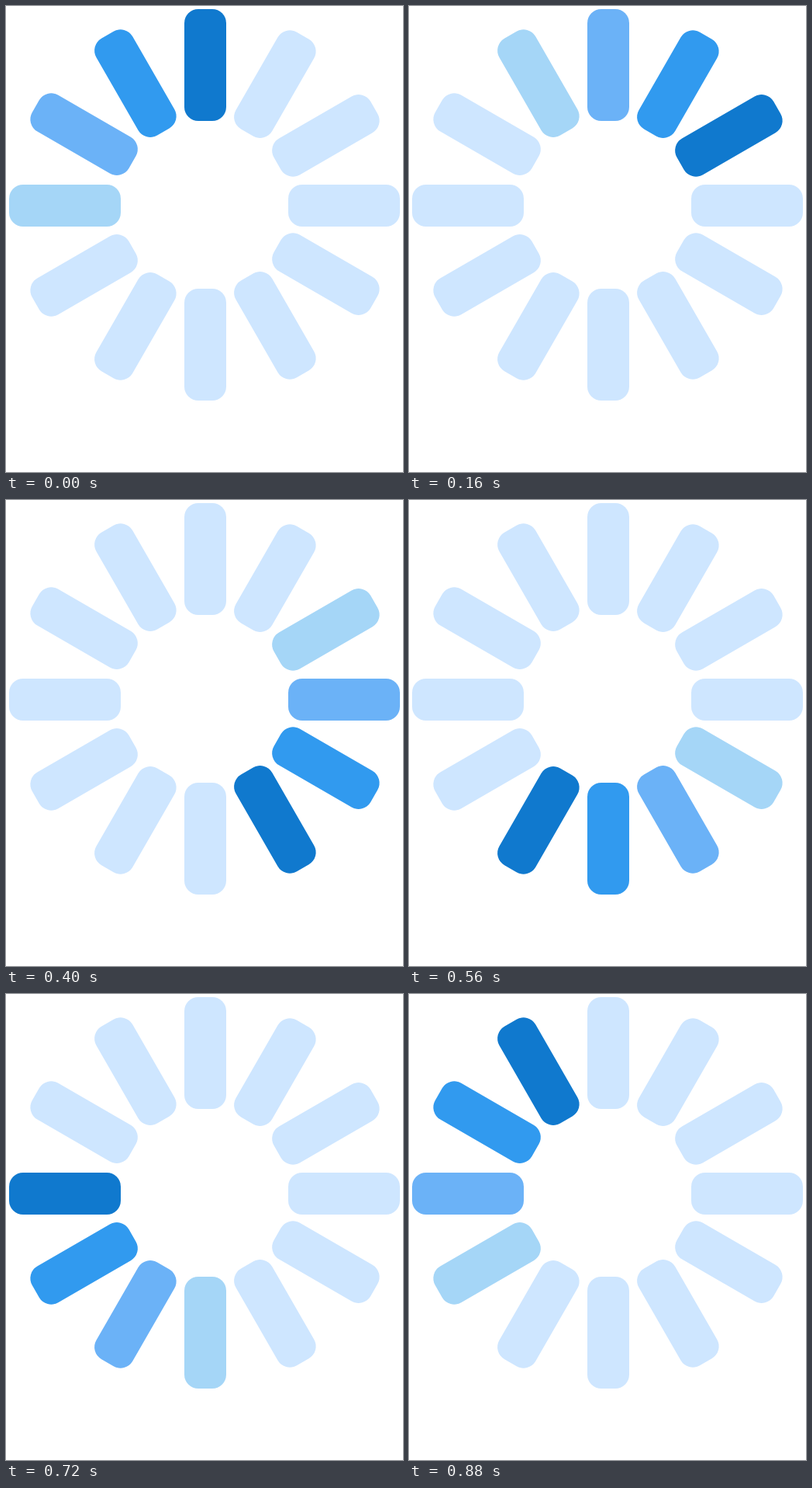
An HTML page for the animation above (0.96 s loop, 512 px wide and 600 px high).

```html
<!DOCTYPE html>
<html lang="en">
<head>
<meta charset="utf-8">
<title>Loading spinner</title>
<style>
  html, body { margin: 0; height: 100%; overflow: hidden; background: #fff; }
  svg { display: block; }
</style>
</head>
<body>
<svg id="spinner" width="512" height="600" viewBox="0 0 512 600"></svg>
<script>
const COUNT = 12, STEP_MS = 80;
const TRAIL = ['#1079ce', '#319aef', '#6bb2f7', '#a5d6f7'];
const IDLE = '#cee6ff';
const spinner = document.getElementById('spinner');

const bars = Array.from({ length: COUNT }, (_, i) => {
  const bar = document.createElementNS('http://www.w3.org/2000/svg', 'rect');
  // Opposite bars share one axis, which lies a pixel off centre.
  const x = i > 3 && i < 10 ? 228 : 230;
  const attributes = { x, y: 4, width: 54, height: 144, rx: 18, transform: `rotate(${i * 30} 256 256)` };
  for (const name in attributes) bar.setAttribute(name, attributes[name]);
  return spinner.appendChild(bar);
});

function draw() {
  const head = Math.floor(performance.now() / STEP_MS) % COUNT;
  bars.forEach((bar, i) => {
    const age = (head - i + COUNT) % COUNT;
    bar.setAttribute('fill', TRAIL[age] || IDLE);
  });
  requestAnimationFrame(draw);
}
draw();
</script>
</body>
</html>
```
